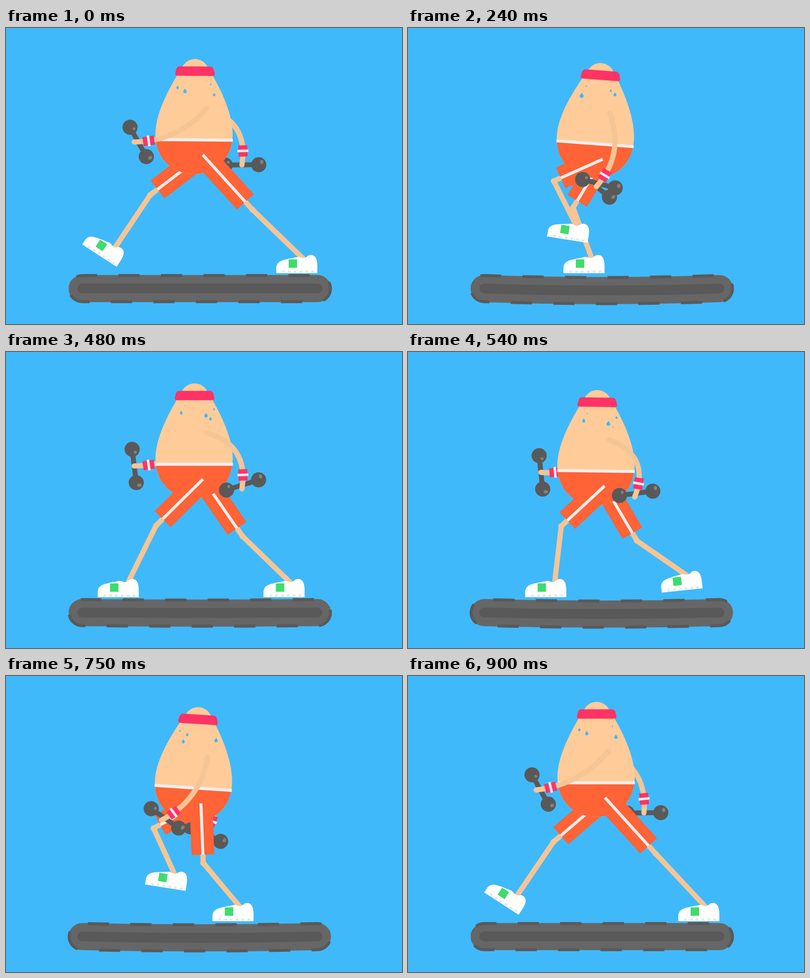
Animation of 800 by 600 pixels, one loop 0.93 s. Source, as an HTML page with a canvas:

```html
<!DOCTYPE html>
<html lang="en">
<head>
<meta charset="utf-8">
<title>Treadmill run</title>
<style>
  html, body { margin: 0; height: 100%; overflow: hidden; background: #40b9fa; }
  canvas { display: block; }
</style>
</head>
<body>
<canvas width="800" height="600"></canvas>
<script>
const ctx = document.querySelector('canvas').getContext('2d');
const SKY = '#40b9fa', SKIN = '#ffcc99', LIMB = '#f5c596', ORANGE = '#ff6336',
      PINK = '#ff3366', PALE = '#eeeeee', DARK = '#595959', GREY = '#666666', GREEN = '#3fdc6c';
const STEP = 30, STEPS = 31, CYCLE = 30, FOOT_SPEED = 25.77, GROUND = 472;
const TAU = 2 * Math.PI;

// Path of a foot in the air: step, ankle x, ankle y, shoe angle.
const SWING = [
  [0, 605, GROUND, 0], [4, 462, 415, -20], [8, 343, 407, 9],
  [12, 215, 434, 38], [13, 217, 450, 33], [15, 218.5, GROUND, 0]];
const DROP_X = [354, 420, 361, 346, 413, 404];

const EGG = new Path2D('M381 62C392 62 401 68 406 77C434 122 458 172 458 215C458 262 425 295 380 295C335 295 302 262 302 215C302 172 328 122 356 77C361 68 370 62 381 62Z');
const HEADBAND = new Path2D('M350 77H412Q417 77 419 83L421 91Q422 96 416 96H346Q340 96 341 91L343 83Q345 77 350 77Z');
const SHOE = new Path2D('M0 0V-10C0-22 8-26 24-29L44-33C50-33 52-30 58-31C63-33 63-37 71-37C80-36 83-27 83-14V0Z');
const DROP = new Path2D('M0-.5C.1-.25.36-.1.36.14A.36.36 0 0 1-.36.14C-.36-.1-.1-.25 0-.5Z');

const rad = deg => deg * Math.PI / 180;

function spline(rows, n) {
  const last = rows.length - 1;
  let i = 0;
  while (i < last - 1 && rows[i + 1][0] <= n) i++;
  const a = rows[i], b = rows[i + 1], span = b[0] - a[0], u = (n - a[0]) / span, w = 1 - u;
  const slope = (j, c) => {
    const p = rows[Math.max(j - 1, 0)], q = rows[Math.min(j + 1, last)];
    return (q[c] - p[c]) / (q[0] - p[0]);
  };
  return [1, 2, 3].map(c => a[c] * w * w * (1 + 2 * u) + b[c] * u * u * (3 - 2 * u)
    + span * u * w * (w * slope(i, c) - u * slope(i + 1, c)));
}

function at(x, y, angle, draw) {
  ctx.save();
  ctx.translate(x, y);
  ctx.rotate(angle);
  draw();
  ctx.restore();
}

function fill(color, path) {
  ctx.fillStyle = color;
  ctx.fill(path);
}

function box(color, x, y, w, h) {
  ctx.fillStyle = color;
  ctx.fillRect(x, y, w, h);
}

function stroke(color, width, cap, path) {
  ctx.strokeStyle = color;
  ctx.lineWidth = width;
  ctx.lineCap = cap;
  ctx.lineJoin = 'round';
  ctx.stroke(path);
}

function polyline(...points) {
  const path = new Path2D();
  points.forEach(p => path.lineTo(...p));
  return path;
}

function oval(color, x, y, rx, ry = rx) {
  ctx.fillStyle = color;
  ctx.beginPath();
  ctx.ellipse(x, y, rx, ry, 0, 0, TAU);
  ctx.fill();
}

function treadmill(n) {
  const sag = 9 * Math.max(0, Math.sin(Math.PI * (n % 15) / 12.5));
  const left = 154, right = 629, middle = 528.2, radius = 26.5;
  const centre = (left + right) / 2, top = middle - radius, bottom = middle + radius;
  const belt = new Path2D(), core = new Path2D();
  belt.moveTo(left, top);
  belt.quadraticCurveTo(centre, top + sag, right, top);
  belt.arc(right, middle, radius, -TAU / 4, TAU / 4);
  belt.quadraticCurveTo(centre, bottom + sag, left, bottom);
  belt.arc(left, middle, radius, TAU / 4, TAU * 3 / 4);
  fill(GREY, belt);
  stroke(GREY, 2, 'butt', belt);
  ctx.setLineDash([42.95, 42.95]);
  ctx.lineDashOffset = -73 - 11.27 * n;
  stroke(DARK, 6, 'butt', belt);
  ctx.setLineDash([]);
  core.moveTo(left, 528);
  core.quadraticCurveTo(centre, 528 + sag, right, 528);
  stroke(DARK, 20, 'round', core);
}

function footPose(n) {
  return n >= 15 ? [605 - FOOT_SPEED * (CYCLE - n), GROUND, 0] : spline(SWING, n);
}

function handPose(n, tilt) {
  const phase = TAU * n / CYCLE, c = Math.cos(phase);
  return [369 - 110 * c, 320 - 22 * c - 67 * c * c, 20 + 41 * c + 6 * Math.sin(2 * phase) + tilt];
}

function leg(hip, [x, y, angle]) {
  const dx = x - hip[0], dy = y - hip[1], d = Math.hypot(dx, dy);
  const bend = Math.max(0, .49 * (309 - d)) / d;
  const knee = [hip[0] + dx / 2 - dy * bend, hip[1] + dy / 2 + dx * bend];
  const hem = hip.map((v, i) => v + (knee[i] - v) * .86);
  stroke(LIMB, 10.5, 'round', polyline(hem, knee, [x, y]));
  oval(LIMB, ...knee, 6);
  at(x, y, rad(angle), () => {
    ctx.translate(-59, 25);
    fill('#ffffff', SHOE);
    for (let i = 0; i < 6; i++) box('#e6e6e6', 12 + 11.8 * i, -5.5, 5, 4.5);
    box(GREEN, 25, -28, 17, 17);
  });
  stroke(ORANGE, 46, 'butt', polyline(hip, hem));
  stroke(PALE, 6, 'butt', polyline(hip, hem));
}

function dumbbell() {
  box(DARK, -34, -5, 68, 10);
  oval(DARK, -34, 0, 15.3);
  oval(DARK, 34, 0, 15.3);
  oval('#808080', -27.5, -5.5, 3);
  oval('#808080', 40, -5.5, 3.4, 4.4);
}

function arm(shoulder, [x, y, angle], grip) {
  const dx = x - shoulder[0], dy = y - shoulder[1], d = Math.hypot(dx, dy);
  const bend = .85 * (204 - d) / d;
  const cx = shoulder[0] + dx / 2 + dy * bend, cy = shoulder[1] + dy / 2 - dx * bend;
  const reach = Math.hypot(x - cx, y - cy);
  at(x - (x - cx) / reach * grip, y - (y - cy) / reach * grip, rad(angle), dumbbell);

  const hose = new Path2D();
  hose.moveTo(...shoulder);
  hose.quadraticCurveTo(cx, cy, x, y);
  stroke(LIMB, 10.5, 'round', hose);

  const t = .83, s = 1 - t;
  const along = (a, b, c) => s * s * a + 2 * s * t * b + t * t * c;
  const tangent = (a, b, c) => s * (b - a) + t * (c - b);
  at(along(shoulder[0], cx, x), along(shoulder[1], cy, y),
    Math.atan2(tangent(shoulder[1], cy, y), tangent(shoulder[0], cx, x)), () => {
      box(PINK, -11.5, -9.2, 23, 18.4);
      box(PALE, -2.5, -11, 5, 22);
    });
}

function sweat(n) {
  DROP_X.forEach((x, i) => {
    const age = (n - 2 - 5.4 * i + STEPS) % STEPS;
    const size = Math.min(.6 + .5 * age, 2.4 * (26.5 - age));
    if (size > 0) at(x, 103 + 1.3 * age, 0, () => {
      ctx.scale(size, size);
      fill(SKY, DROP);
    });
  });
}

function body(n, dy, lean) {
  at(380, 195 + dy, rad(lean), () => {
    ctx.translate(-380, -195);
    fill(SKIN, EGG);
    ctx.save();
    ctx.clip(EGG);
    box(ORANGE, 300, 226, 160, 70);
    ctx.restore();
    box(PALE, 302, 223, 156.5, 6);
    fill(PINK, HEADBAND);
    sweat(n);
  });
}

function draw(n) {
  const dy = 5 + 18 * Math.cos(TAU * (n - 4.55) / 15.9);
  const lean = 2.2 * (1 - Math.cos(TAU * (n - 1.5) / 14.5));
  const hip = [398 - 1.1 * lean, 256 + dy + .3 * lean];
  const shoulder = [405 + .6 * lean, 162 + dy + .5 * lean];
  box(SKY, 0, 0, 800, 600);
  treadmill(n);
  arm(shoulder, handPose(n + 14, 22), 0);
  leg(hip, footPose((n + 13) % CYCLE));
  body(n, dy, lean);
  leg(hip, footPose(n % CYCLE));
  arm(shoulder, handPose(n, 0), 8);
}

function tick() {
  draw(Math.floor(performance.now() / STEP) % STEPS);
  requestAnimationFrame(tick);
}
tick();
</script>
</body>
</html>
```
